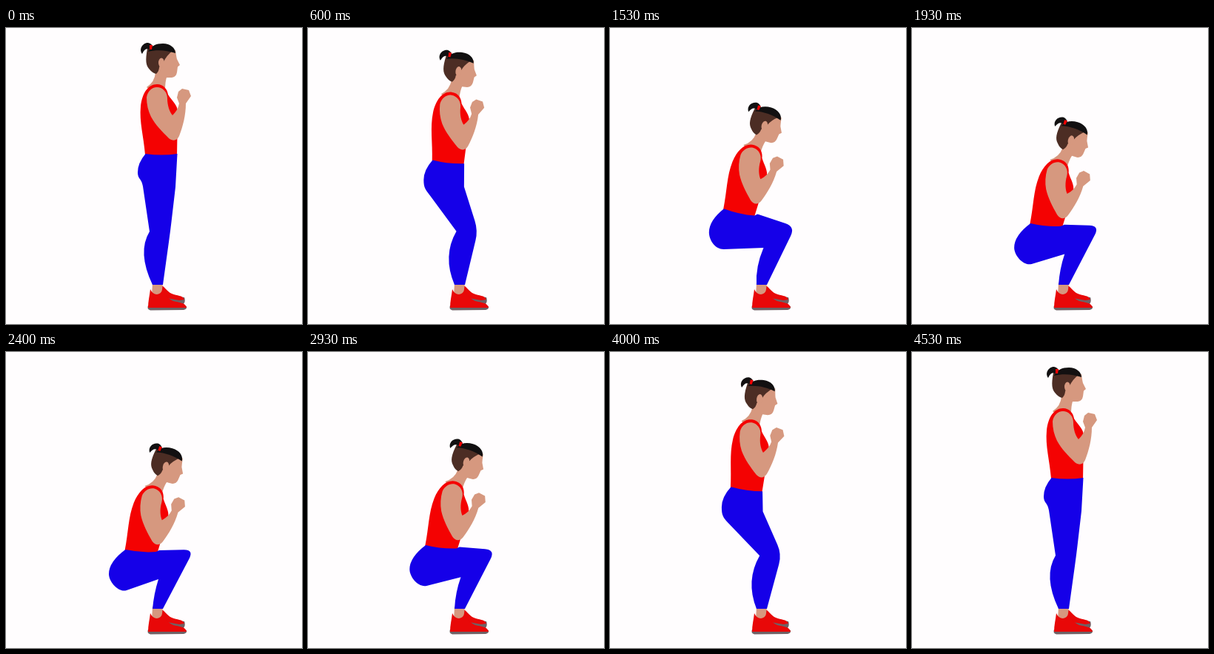
Animation of 400x400 px, one loop 4.6 s. Source, as an HTML page:

```html
<!DOCTYPE html>
<html lang="en">
<head>
<meta charset="utf-8">
<title>Squat</title>
<style>
  html, body { margin: 0; height: 100%; overflow: hidden; background: #fffdfe; }
  svg { display: block; width: 100vw; height: 100vh; }
  .skin { fill: #d6987f; }
  .shirt { fill: #f40202; }
  .shoe { fill: #e80808; }
  .sole { fill: #6f6165; }
  .black { fill: #121011; }
  .brown { fill: #4c2d24; }
  .blue { fill: #1500e8; }
</style>
</head>
<body>
<svg viewBox="0 0 400 400">
  <path class="sole" d="M212 360L241 364Q243 369 240 373L220 372Z"/>
  <path class="shoe" d="M209 348C214 348 217 356 224 359C231 362 239 361 241 367L234 368L212 364Z"/>
  <path class="skin" d="M198 344H212L210 362H197Z"/>
  <path class="sole" d="M192 375L244 376Q245 380 240 381L195 381.500Q190 380 192 375Z"/>
  <path class="shoe" d="M195 353Q198 360 204 360Q210 359 211 354C215 360 219 366 226 369C234 371 243 371 244 378L192 378C192 369 194 362 195 353Z"/>
  <!-- Upper body, drawn standing; it turns around the middle of the waist -->
  <g id="torso">
    <path class="skin" d="M205 30L229 30Q230 38 231 42L235 50L232 52.500L231 60Q230 66 224 67L217 67Q215 73 215 84L204 92L190 80Q201 73 202 60Z"/>
    <path class="shirt" d="M188 171C186 146 180 127 182 106C184 88 192 76 204 76C213 76 218 83 219 90C224 98 232 104 232 113L231 173Q209 176 188 171Z"/>
    <path class="skin" d="M204 80C211 80 218 86 218 95C218 105 221 113 225 118C230 113 233 108 234 102L231 94L233 86L238 82L247 84L250 92L243 102C243 118 239 133 234 146C231 153 225 153 220 149C211 140 202 131 196 120C192 112 190 103 190 94C191 86 197 80 204 80Z"/>
    <path class="brown" d="M191 28C188 44 189 51 194 56Q198 61 203 62Q207 58 207 53L213 46Q216 38 226 30Z"/>
    <ellipse class="skin" cx="210" cy="47" rx="4" ry="6.500"/>
    <path class="black" d="M192 32C196 24 203 21 212 21C222 21 229 27 229 34C217 30 204 29 192 32Z"/>
    <path class="black" d="M184 35C179 28 185 20 192 20Q197 21 199 26L194 29C189 27 187 29 184 35Z"/>
    <path class="shirt" d="M194 23L198 23L197 29L194 29Z"/>
  </g>
  <path id="legs" class="blue"/>
</svg>
<script>
const LOOP = 4600;
const torso = document.getElementById('torso');
const legs = document.getElementById('legs');
const cuffBack = [198, 347], cuffFront = [212, 347];

// Each joint runs along a quadratic arc: standing point, control point, deepest point
const arcs = {
  waist:     [[210, 170], [150, 191], [182, 273]],
  seat:      [[178, 195], [115, 214], [139, 300]],
  underSeat: [[185, 214], [125, 240], [163, 322]],
  kneeBack:  [[194, 275], [213, 270], [206, 307]],
  calf:      [[177, 303], [188, 315], [200, 326]],
  kneeFront: [[222, 275], [242, 272], [254, 267]],
  groin:     [[229, 215], [175, 207], [207, 268]]
};

const quad = (a, b, c, s) => a * (1 - s) ** 2 + 2 * b * s * (1 - s) + c * s * s;
const along = ([a, b, c], s) => [0, 1].map(k => quad(a[k], b[k], c[k], s));

// Point at a given distance from p towards q
function toward(p, q, distance) {
  const k = distance / Math.hypot(q[0] - p[0], q[1] - p[1]);
  return [p[0] + (q[0] - p[0]) * k, p[1] + (q[1] - p[1]) * k];
}

// How far the body has sunk: a little slower down than up
function sink(time) {
  const s = Math.max(0, Math.min(1, (time - 120) / 2150, (4530 - time) / 2000));
  return s ** 3 * (10 - 15 * s + 6 * s * s);
}

function draw(now) {
  const time = Math.floor(now % LOOP * .015 + .1) / .015;
  const bend = sink(time) ** .63;
  const { waist: [x, y], seat, underSeat, kneeBack, calf, kneeFront, groin } =
    Object.fromEntries(Object.entries(arcs).map(([name, arc]) => [name, along(arc, bend)]));

  const lean = quad(0, 18, 16, bend), angle = lean * Math.PI / 180;
  const dx = 21.5 * Math.cos(angle), dy = 21.5 * Math.sin(angle);
  const back = [x - dx, y - dy];
  const front = [x + dx, Math.min(y + dy, groin[1] + 2)];
  const halfway = (p, q) => (p[1] + q[1]) / 2;

  torso.setAttribute('transform', `translate(${x} ${y}) rotate(${lean}) translate(-210 -170)`);
  legs.setAttribute('d', `M${back}
    Q${seat[0]} ${halfway(back, seat)} ${seat}
    C${seat[0]} ${halfway(seat, underSeat)} ${toward(underSeat, kneeBack, -11)} ${underSeat}
    L${kneeBack} Q${calf} ${cuffBack} L${cuffFront}
    L${toward(kneeFront, cuffFront, 14)} Q${kneeFront} ${toward(kneeFront, groin, 14)}
    L${groin} L${front}
    Q${x} ${halfway(back, front) + 3} ${back}Z`);
}

function tick() {
  draw(performance.now());
  requestAnimationFrame(tick);
}
tick();
</script>
</body>
</html>
```
